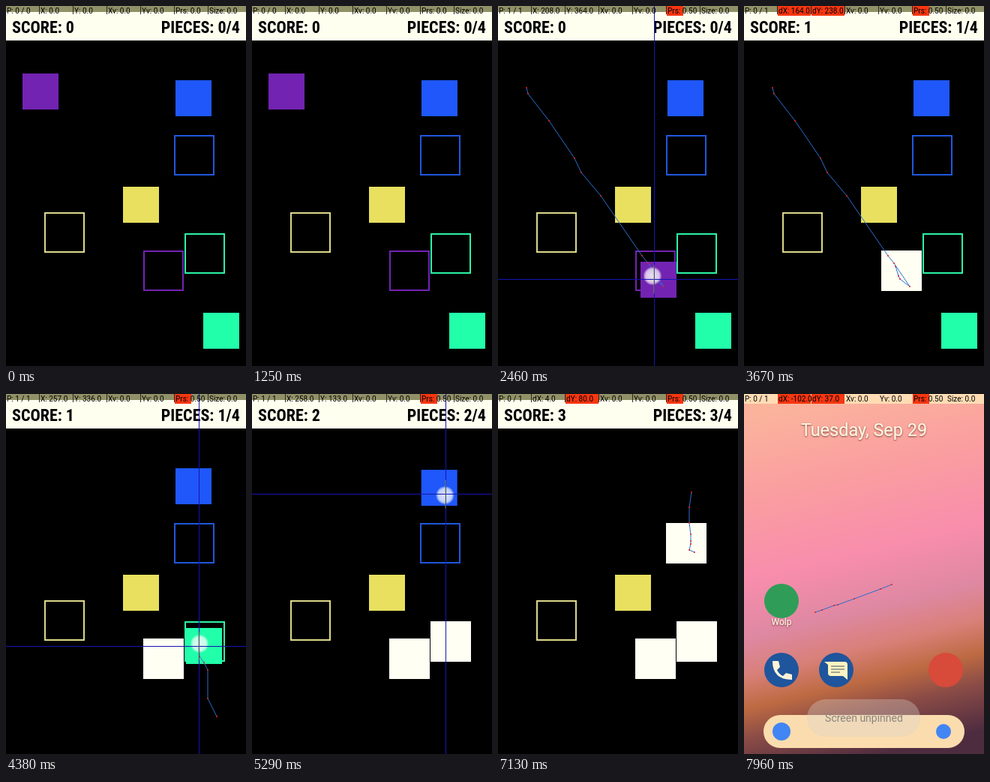
An HTML page that plays this animation: 320 by 480 pixels, repeating every 8000 ms.

```html
<!DOCTYPE html>
<html lang="en">
<head>
<meta charset="utf-8">
<title>Shape drag</title>
<style>
html, body { margin: 0; width: 100%; height: 100%; overflow: hidden; background: #000; }
svg { display: block; width: 320px; height: 480px; font-family: Roboto, sans-serif; }
.score { font: 700 22px "Roboto Condensed", Roboto, sans-serif; font-stretch: 75%; }
.cell { font-size: 10px; }
</style>
</head>
<body>
<svg id="stage" viewBox="0 0 320 480">
  <defs>
    <linearGradient id="sky" x1="0.42" y1="0" x2="0.58" y2="1">
      <stop offset="0" stop-color="#fbb39c"/>
      <stop offset=".22" stop-color="#fa9ea0"/>
      <stop offset=".44" stop-color="#f88dac"/>
      <stop offset=".6" stop-color="#de88a2"/>
      <stop offset=".7" stop-color="#d88078"/>
      <stop offset=".79" stop-color="#bd6a42"/>
      <stop offset=".87" stop-color="#8c4c46"/>
      <stop offset="1" stop-color="#4e2c40"/>
    </linearGradient>
    <radialGradient id="glow">
      <stop offset="0" stop-color="#fff" stop-opacity=".85"/>
      <stop offset=".72" stop-color="#fff" stop-opacity=".72"/>
      <stop offset=".85" stop-color="#fff" stop-opacity=".45"/>
      <stop offset="1" stop-color="#fff" stop-opacity="0"/>
    </radialGradient>
    <filter id="shade" x="-10%" y="-30%" width="120%" height="170%">
      <feDropShadow dx="0" dy="1" stdDeviation="1" flood-color="#502020" flood-opacity=".8"/>
    </filter>
  </defs>

  <g id="game">
    <rect width="320" height="480"/>
    <rect width="320" height="46" fill="#fffff0"/>
    <rect width="320" height="8" fill="#919168"/>
    <g id="gaps" fill="#2a2a20"></g>
    <text id="score" class="score" x="8" y="36"></text>
    <text id="pieces" class="score" x="312" y="36" text-anchor="end"></text>
    <g id="holes"></g>
    <g id="blocks"></g>
  </g>

  <g id="home">
    <rect width="320" height="480" fill="url(#sky)"/>
    <rect width="320" height="13" fill="#ffdcb4"/>
    <g fill="#fff6e0" filter="url(#shade)" text-anchor="middle">
      <text x="160" y="56" font-size="23.5">Tuesday, Sep 29</text>
      <text x="50" y="308" font-size="12">Wolp</text>
    </g>
    <circle cx="50" cy="276" r="23" fill="#2f9d58"/>
    <circle cx="50" cy="368" r="23" fill="#1f559c"/>
    <path d="M38 356h8l2 8-4 4q3 6 8 8l4-4 8 2v7q-26 0-26-25z" fill="#fff3d8"/>
    <circle cx="123" cy="368" r="23" fill="#1f559c"/>
    <path d="M112 357h22q4 0 4 4v20l-6-5h-16q-4 0-4-4v-11l-5-4z" fill="#fff3c0"/>
    <path d="M116 363h18M116 367h18M116 371h12" stroke="#7d8a86" stroke-width="1.5"/>
    <circle cx="269" cy="368" r="23" fill="#d84a3a"/>
    <rect x="26" y="428" width="268" height="44" rx="22" fill="#fbdcae"/>
    <circle cx="50" cy="450" r="12" fill="#4285f4"/>
    <circle cx="266" cy="450" r="10" fill="#4285f4"/>
    <g id="toast">
      <rect x="84" y="407" width="151" height="50" rx="25" fill="#d8d0c8" fill-opacity=".35"/>
      <text x="160" y="437" font-size="14" text-anchor="middle" fill="#8c8480">Screen unpinned</text>
    </g>
  </g>

  <path id="trail" fill="none" stroke="#2a6fd0"/>
  <path id="dots" fill="none" stroke="#f02010" stroke-width="2" stroke-linecap="round"/>
  <circle id="touch" r="12.5" fill="url(#glow)"/>
  <path id="cross" fill="none" stroke="#1414b4"/>
  <path id="axis" fill="none" stroke="#9aa82c" stroke-opacity=".75"/>
  <g id="strip"></g>
</svg>

<script>
const LOOP = 8000, SLOP = 8;
const $ = id => document.getElementById(id);

// path: [time, x, y]; from/to: corners of the block and its hole; lead: how far the block runs ahead, ms
const drags = [
  { color: '#7323b2', edge: '#7323b2', from: [22, 90], to: [183, 326], up: 2920, gone: 3290, lead: 30,
    path: [[1290, 38, 109], [1500, 40, 117], [1650, 68, 153], [1800, 102, 203], [1880, 111, 222], [1990, 137, 253],
           [2150, 192, 333], [2200, 200, 343], [2310, 221, 374], [2460, 208, 364], [2490, 206, 360], [2750, 202, 347]] },
  { color: '#22ffaa', edge: '#2cf5a6', from: [263, 409], to: [238, 303], up: 4770, gone: 4960, lead: 30,
    path: [[3680, 281, 430], [4000, 269, 406], [4130, 269, 368], [4200, 264, 358], [4260, 258, 350],
           [4380, 257, 336], [4410, 258, 333], [4590, 259, 327]] },
  { color: '#1f57fa', edge: '#2058dc', from: [226, 99], to: [224, 172], up: 6800, gone: 7130, lead: 0,
    path: [[5260, 258, 131], [5560, 255, 151], [5700, 255, 172], [5850, 257, 187], [5920, 257, 196],
           [5950, 257, 200], [6200, 255, 208], [6500, 262, 211]] },
  { color: '#e8e05e', edge: '#dcd88c', from: [156, 241], to: [51, 275], up: 7740, gone: 7800, lead: 0,
    path: [[7345, 197, 254], [7420, 182, 260], [7500, 147, 273], [7550, 125, 281], [7580, 120, 282],
           [7640, 104, 288], [7700, 95, 291]] }
];

function add(parent, tag, attrs) {
  const el = document.createElementNS('http://www.w3.org/2000/svg', tag);
  set(el, attrs);
  return parent.appendChild(el);
}
function set(el, attrs) {
  for (const k in attrs) el.setAttribute(k, attrs[k]);
}
const ramp = (t, a, b) => Math.min(1, Math.max(0, (t - a) / (b - a)));
const fixed = (v, n = 1) => v.toFixed(n);

function at(path, t) {
  let i = 1;
  while (i < path.length - 1 && t > path[i][0]) i++;
  const [a, b] = [path[i - 1], path[i]], k = ramp(t, a[0], b[0]);
  return [a[1] + (b[1] - a[1]) * k, a[2] + (b[2] - a[2]) * k];
}

for (const d of drags) {
  d.hole = add($('holes'), 'rect', { x: d.to[0] + 1, y: d.to[1] + 1, width: 52, height: 52, stroke: d.edge, 'stroke-width': 2 });
  d.block = add($('blocks'), 'rect', { width: 48, height: 48, fill: d.color });
}
const cells = Array.from({ length: 7 }, (_, i) => {
  if (i) add($('gaps'), 'rect', { x: i * 45 - 1, width: 1, height: 11 });
  return {
    bar: add($('strip'), 'rect', { x: i * 45, height: 13, fill: '#f83610' }),
    label: add($('strip'), 'text', { x: i * 45 + 1, y: 10, class: 'cell' })
  };
});

// Without a condensed face the regular one needs a smaller size.
$('score').textContent = 'SCORE: 0';
if ($('score').getComputedTextLength() > 88)
  for (const id of ['score', 'pieces']) $(id).style.fontSize = '19.6px';

function showStrip(values, bars) {
  cells.forEach((c, i) => {
    c.label.textContent = values[i];
    set(c.bar, { width: bars[i] || 0 });
  });
}

function drawBlocks(t) {
  for (const d of drags) {
    const done = t >= d.up, start = d.path[0], p = at(d.path, t + d.lead);
    const moving = t >= start[0];
    set(d.hole, { fill: done ? '#fffff4' : 'none', stroke: done ? '#fffff4' : d.edge });
    set(d.block, {
      x: d.from[0] + (moving ? p[0] - start[1] : 0),
      y: d.from[1] + (moving ? p[1] - start[2] : 0),
      visibility: done ? 'hidden' : 'inherit'
    });
  }
  const n = drags.filter(d => t >= d.up).length;
  $('score').textContent = 'SCORE: ' + n;
  $('pieces').textContent = `PIECES: ${n}/4`;
}

function drawPointer(t) {
  const d = drags.filter(d => t >= d.path[0][0]).pop();
  const down = d && t < d.up;
  for (const id of ['cross', 'axis']) set($(id), { visibility: down ? 'visible' : 'hidden' });
  set($('touch'), { opacity: !d || t >= d.gone ? 0 : down ? 1 : 0.4 });
  if (!d) {
    set($('trail'), { d: '' });
    set($('dots'), { d: '' });
    showStrip(['P: 0 / 0', 'X: 0.0', 'Y: 0.0', 'Xv: 0.0', 'Yv: 0.0', 'Prs: 0.0', 'Size: 0.0'], []);
    return;
  }
  const [x, y] = at(d.path, t), [cx, cy] = at(d.path, t + 30);
  const past = d.path.filter(p => p[0] <= t).map(p => `${p[1]} ${p[2]}`);
  set($('trail'), { d: `M${past.join('L')}L${x} ${y}` });
  set($('dots'), { d: past.map(p => `M${p}h.01`).join('') });
  set($('touch'), { cx, cy });
  const px = Math.round(x) + 0.5, py = Math.round(y) + 0.5;
  set($('cross'), { d: `M${px} 0V480M0 ${py}H320` });
  set($('axis'), { d: `M${px - 0.5} ${py - 19}v38` });

  const dx = Math.round(x - d.path[0][1]), dy = Math.round(y - d.path[0][2]);
  const red = v => Math.abs(v) > SLOP ? 44 : 0;
  showStrip([
    down ? 'P: 1 / 1' : 'P: 0 / 1',
    down ? 'X: ' + fixed(Math.round(x)) : 'dX: ' + fixed(dx),
    down ? 'Y: ' + fixed(Math.round(y)) : 'dY: ' + fixed(dy),
    'Xv: 0.0', 'Yv: 0.0', 'Prs: ' + fixed(0.5, 2), 'Size: 0.0'
  ], [0, down ? 0 : red(dx), down ? 0 : red(dy), 0, 0, 22]);
}

const begin = performance.now();
function draw() {
  const t = (performance.now() - begin) % LOOP;
  drawBlocks(t);
  drawPointer(t);
  set($('home'), { opacity: ramp(t, 7780, 7880) });
  set($('toast'), { opacity: ramp(t, 7860, 7960) });
  requestAnimationFrame(draw);
}
draw();
</script>
</body>
</html>
```
